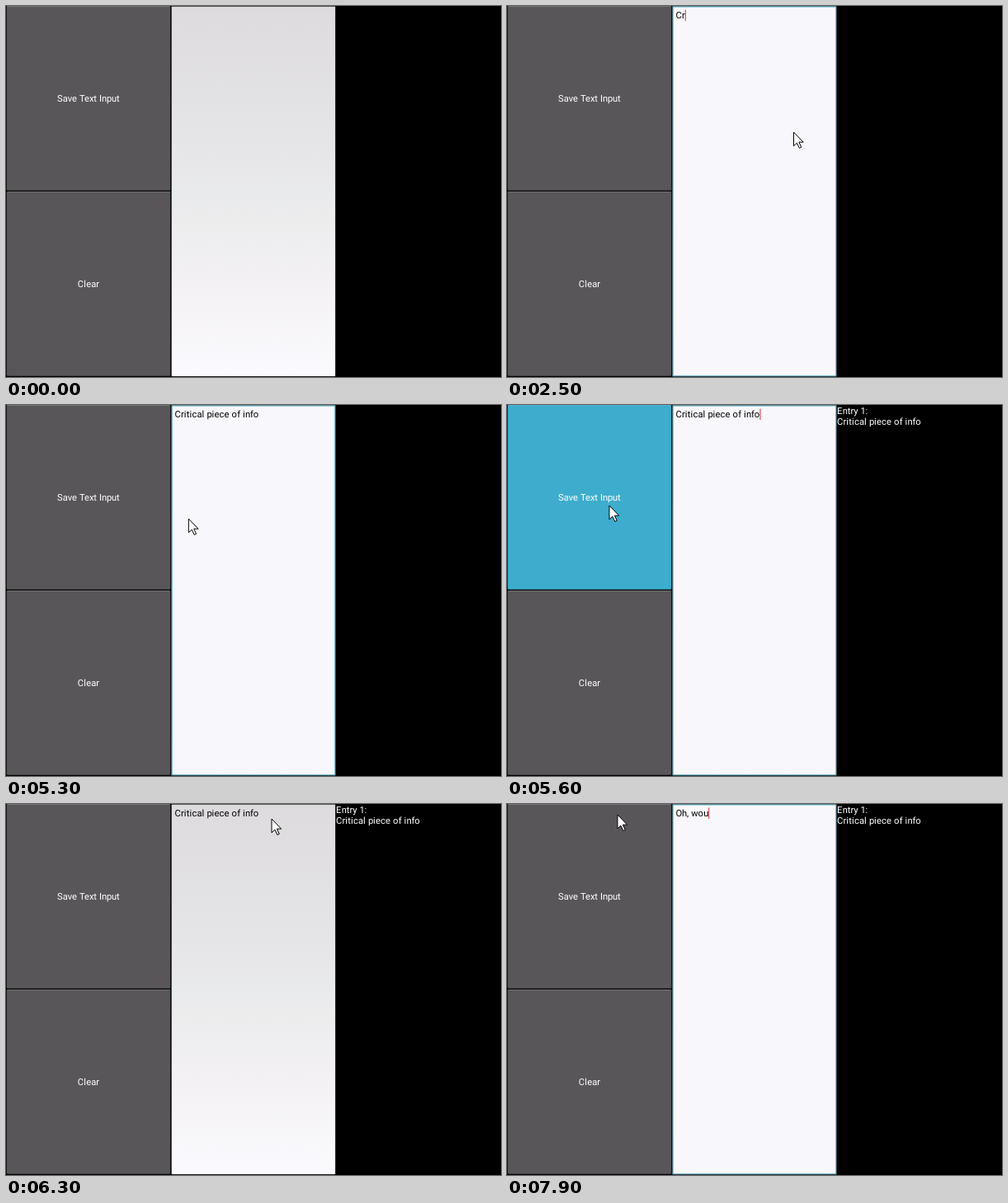
Write an HTML page that moves like this. It is 600x450 px and loops after 8000 ms.

```html
<!DOCTYPE html>
<html lang="en">
<head>
<meta charset="utf-8">
<title>Save Text Input</title>
<style>
  html, body { margin: 0; width: 100%; height: 100%; overflow: hidden; background: #000; }
  svg { display: block; width: 600px; height: 450px; }
  text { font: 15px Roboto, sans-serif; white-space: pre; text-rendering: geometricPrecision; }
</style>
</head>
<body>
<!-- The app window is 800 x 600 units, shown at three quarters size. -->
<svg viewBox="0 0 800 600">
  <defs>
    <linearGradient id="shade" x1="0" y1="0" x2="0" y2="1">
      <stop offset="0" stop-color="#dddbdd"/>
      <stop offset=".35" stop-color="#e5e4e7"/>
      <stop offset=".5" stop-color="#e9eaeb"/>
      <stop offset=".72" stop-color="#f2f0f2"/>
      <stop offset="1" stop-color="#fbfafe"/>
    </linearGradient>
  </defs>
  <rect width="800" height="600" fill="#000"/>
  <g id="buttons"></g>
  <rect x="267.6" y=".8" width="264.6" height="598" fill="url(#shade)"/>
  <g id="focus">
    <rect x="268.3" y="1.3" width="263.4" height="597" fill="#f8f7fb" stroke="#5ab0c8" stroke-width="1.4"/>
    <rect id="mark" y="6" height="21" fill="#2fa7d4" fill-opacity=".5"/>
  </g>
  <g id="words"></g>
  <rect id="caret" y="6" width="1.33" height="18" fill="#d8283c"/>
  <path id="mouse" d="M0 0V16.8L3.9 13.2L6.9 19.4L9.3 18.3L6.4 12.2H11.7Z"
        fill="#fff" stroke="#000" stroke-width="1"/>
</svg>
<script>
const LOOP = 8000, STEP = 100, LEFT = 272.67;
const $ = id => document.getElementById(id);
const pen = document.createElement('canvas').getContext('2d');
pen.font = '150px Roboto, sans-serif';

function add(parent, tag, attrs) {
  const el = document.createElementNS('http://www.w3.org/2000/svg', tag);
  for (const k in attrs) el.setAttribute(k, attrs[k]);
  return parent.appendChild(el);
}

const width = s => pen.measureText(s).width / 10;

// Glyph offsets on whole units, kerning included; the last one is the line width.
function offsets(str) {
  const xs = [0];
  for (let i = 0; i < str.length; i++) {
    const next = str[i + 1] || '';
    xs.push(xs[i] + Math.round(width(str[i] + next) - width(next)));
  }
  return xs;
}

function write(el, str, x) {
  const xs = offsets(str);
  el.textContent = str;
  el.setAttribute('x', xs.slice(0, -1).map(v => (x + v).toFixed(2)).join(' '));
  return xs.at(-1);
}

function button(label, y) {
  const g = $('buttons');
  const face = add(g, 'rect', { x: 1, y, width: 264.6, height: 298.2, rx: 1.5 });
  const edge = add(g, 'rect', { x: 2, y, width: 262.6, height: 1.2, fill: '#fff', 'fill-opacity': .2 });
  const text = add(g, 'text', { y: y + 155, fill: '#fff' });
  write(text, label, 133.3 - offsets(label).at(-1) / 2);
  return down => {
    face.setAttribute('fill', down ? '#3eaccc' : '#585659');
    edge.setAttribute('fill-opacity', down ? .1 : .2);
  };
}

const paintSave = button('Save Text Input', 0);
button('Clear', 300)(false);

const NOTE = 'Critical piece of info', REPLY = 'Oh, wou';
const typed = add($('words'), 'text', { y: 20, fill: '#000' });
const entry = add($('words'), 'g', { fill: '#fff' });
write(add(entry, 'text', { y: 14 }), 'Entry 1:', 533.3);
write(add(entry, 'text', { y: 32 }), NOTE, 533.3);

// Bursts of typing: start, then how many letters arrive on each step.
const bursts = [
  [2300, '1'], [2500, '1'], [2700, '111112'], [3400, '111'], [3800, '12112'], [4400, '111']
];
const keys = bursts.flatMap(([at, run]) => [...run].map((n, i) => [at + i * STEP, +n]));

function textAt(t) {
  if (t >= 7200) return REPLY.slice(0, (t - 7200) / STEP);
  return NOTE.slice(0, keys.reduce((n, [at, k]) => at <= t ? n + k : n, 0));
}

// Pointer way points: time, x, y on the stage.
const way = [
  [300, 508, 66], [600, 442, 196], [800, 388, 262], [1000, 356, 185], [1100, 350, 157],
  [1200, 347.5, 153], [5000, 347.5, 153], [5200, 270, 146], [5500, 124, 122], [5700, 124, 122],
  [5900, 150, 100], [6300, 322, 18], [6400, 322, 18], [6600, 134, 13], [LOOP, 134, 13]
];

function pointerAt(t) {
  const i = Math.max(1, way.findIndex(p => p[0] > t));
  const [t0, x0, y0] = way[i - 1], [t1, x1, y1] = way[i];
  const k = (t - t0) / (t1 - t0);
  return [x0 + (x1 - x0) * k, y0 + (y1 - y0) * k];
}

const within = (t, a, b) => t >= a && t < b;
const show = (el, on) => el.setAttribute('visibility', on ? 'visible' : 'hidden');

function draw(time) {
  const t = Math.floor(time % LOOP / STEP) * STEP;
  const focused = within(t, 1300, 5700) || t >= 6400;
  const blinkOff = within(t, 1700, 2200) || within(t, 5100, 5600) || within(t, 7000, 7200);
  const dragging = within(t, 6400, 7200);
  const [x, y] = pointerAt(t);

  paintSave(within(t, 5500, 5700));
  show($('focus'), focused);
  show(entry, t >= 5500);

  const str = textAt(t);
  const end = LEFT + write(typed, str, LEFT);
  const caretX = dragging ? Math.min(end, Math.max(LEFT, x / .75)) : end;
  $('caret').setAttribute('x', caretX);
  show($('caret'), focused && !blinkOff);

  show($('mark'), within(t, 6500, 6800));
  $('mark').setAttribute('x', caretX);
  $('mark').setAttribute('width', Math.max(0, 532 - caretX));

  show($('mouse'), t >= 300);
  $('mouse').setAttribute('transform', `translate(${x / .75} ${y / .75}) scale(${4 / 3})`);
}

function tick() {
  draw(performance.now());
  requestAnimationFrame(tick);
}
tick();
</script>
</body>
</html>
```
